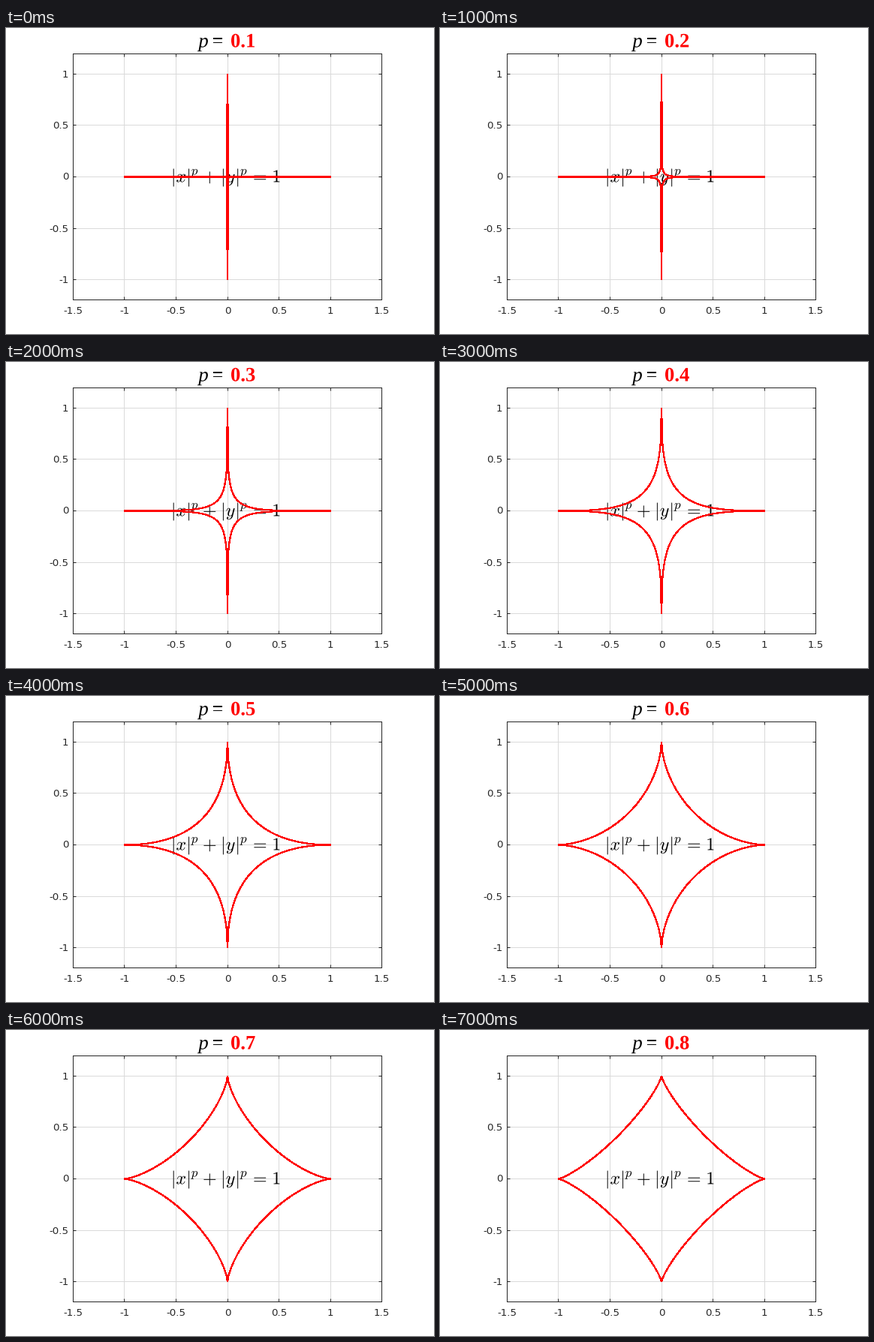
A matplotlib script that plays this animation: 570x408 px, repeating every 8000 ms.

```python
import math

import matplotlib.pyplot as plt
import numpy as np
from matplotlib.animation import FuncAnimation
from matplotlib.patches import PathPatch
from matplotlib.textpath import TextPath
from matplotlib.transforms import Affine2D

W, H, DPI = 570, 408, 100
PT = 72 / DPI                     # one pixel in points
CX, CY, UNIT = 295, 198.5, 137.1  # plot centre and pixels per data unit
LEFT, RIGHT, TOP, BOTTOM = 89, 500, 34, 362
INK, GRID, RED = "#262626", "#dadada", "#ff0000"

plt.rcParams["path.simplify"] = False
fig = plt.figure(figsize=(W / DPI, H / DPI), dpi=DPI, facecolor="white")
ax = fig.add_axes([0, 0, 1, 1])
ax.set_xlim(0, W)
ax.set_ylim(H, 0)
ax.axis("off")


def rule(x0, y0, x1, y1, color, z):
    ax.plot([x0, x1], [y0, y1], color=color, lw=PT, zorder=z, snap=True,
            solid_capstyle="butt" if z < 3 else "projecting")


def ink_path(s, size, prop):
    """Text outline shifted so that its ink starts at x = 0."""
    path = TextPath((0, 0), s, size=size, prop=prop)
    return Affine2D().translate(-path.get_extents().x0, 0).transform_path(path)


def place(s, x, y, size, prop, color="black"):
    move = Affine2D().scale(1, -1).translate(x, y)
    patch = PathPatch(ink_path(s, size, prop), fc=color, lw=0, zorder=4,
                      transform=move + ax.transData)
    ax.add_patch(patch)
    return patch


# Grid, ticks and labels
label = dict(family="DejaVu Sans", size=13.33 * PT, color=INK, va="baseline")
for v in np.arange(-1.5, 1.6, 0.5):
    x = math.floor(CX + UNIT * v)
    rule(x, TOP, x, BOTTOM, GRID, 1)
    rule(x, TOP, x, TOP + 4, INK, 2)
    rule(x, BOTTOM - 4, x, BOTTOM, INK, 2)
    ax.text(CX + UNIT * v, 380.6, f"{v:g}", ha="center", **label)
for v in np.arange(-1, 1.1, 0.5):
    y = math.floor(CY - UNIT * v)
    rule(LEFT, y, RIGHT, y, GRID, 1)
    rule(LEFT, y, LEFT + 4, y, INK, 2)
    rule(RIGHT - 4, y, RIGHT, y, INK, 2)
    ax.text(83.5, y + 4.5, f"{v:g}", ha="right", **label)
for y in (TOP, BOTTOM):
    rule(LEFT, y, RIGHT, y, INK, 3)
for x in (LEFT, RIGHT):
    rule(x, TOP, x, BOTTOM, INK, 3)

# Equation, set glyph by glyph with TeX spacing
MATH = dict(family="DejaVu Sans", math_fontfamily="cm")
for s, x in [("|", 222.7), ("x", 227.2), ("|", 243.1), ("+", 263.3),
             ("|", 288.9), ("y", 293.4), ("|", 308.2), ("=", 330.3),
             ("1", 356.4)]:
    place(f"${s}$", x, 205.5, 24, MATH)
for x in (246.2, 311.4):
    place("$p$", x, 195.6, 17, MATH)

# Title
SERIF = dict(family="Liberation Serif")
BOLD = dict(SERIF, weight="bold")
SIZE = 26.67
place("p", 254.8, 25.5, SIZE, dict(SERIF, style="italic"))
place("=", 276, 25.5, SIZE, SERIF)
value = place("0.1", 300, 25.5, SIZE, BOLD, RED)

# Without antialiasing every touched pixel is filled, so the stroke is thin
curve, = ax.plot([], [], color=RED, lw=1.2 * PT, antialiased=False, snap=False,
                 solid_capstyle="butt", solid_joinstyle="round", zorder=5)
t = np.linspace(0, 1, 101)


def draw(i):
    p = (i + 1) / 10
    y = np.maximum(1 - t ** p, 0) ** (1 / p)
    xs, ys = [], []
    for sx in (1, -1):
        for sy in (1, -1):
            xs += [*(CX + sx * UNIT * t), np.nan]
            ys += [*(CY - sy * UNIT * y), np.nan]
    curve.set_data(xs, ys)
    value.set_path(ink_path(f"{p:.1f}", SIZE, BOLD))
    return curve, value


anim = FuncAnimation(fig, draw, frames=8, interval=1000, repeat=True,
                     repeat_delay=0, blit=False)
plt.show()
```
